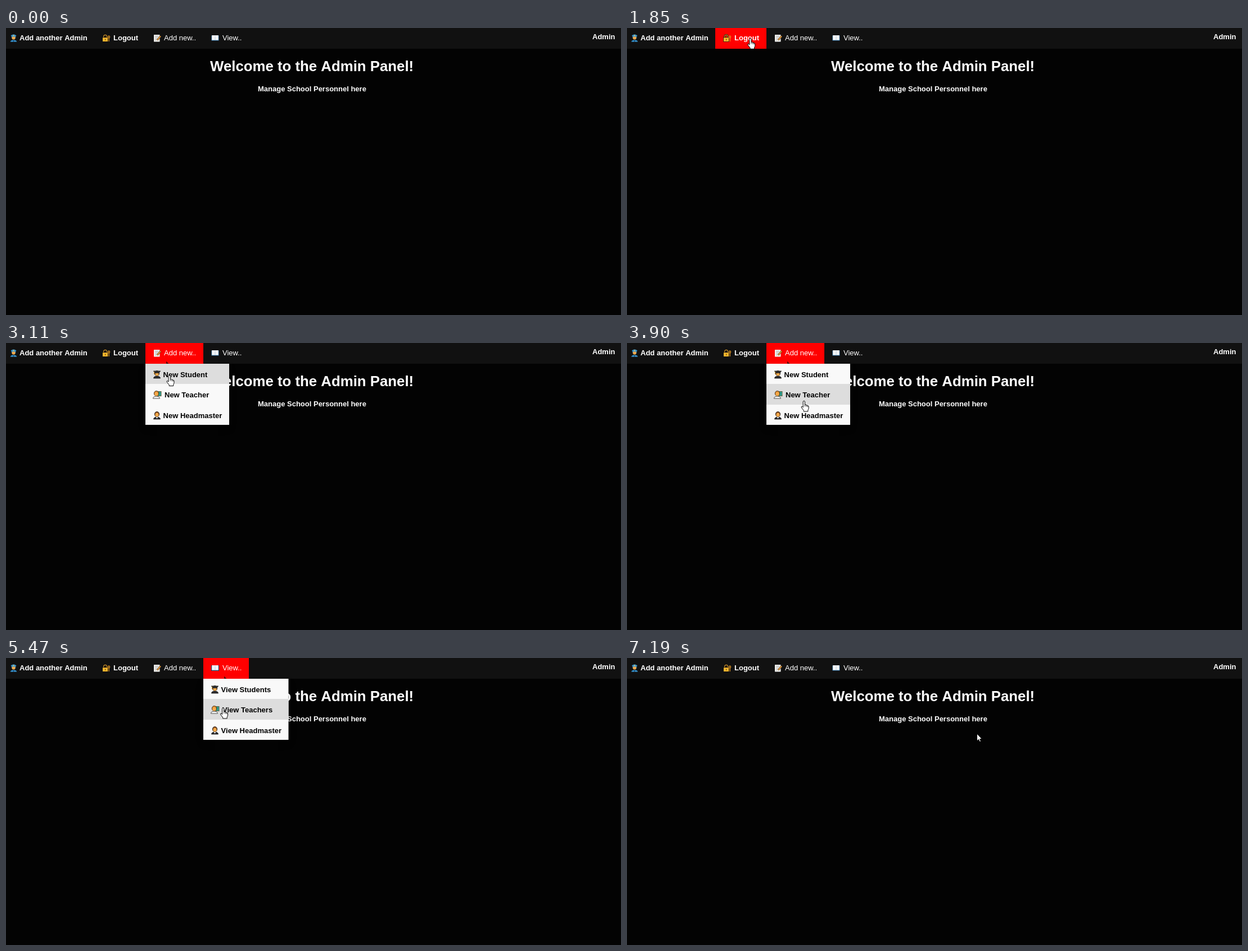
These frames come from a looping animation (1094 px wide and 512 px high, 7.29 s). An HTML page with a canvas:

```html
<!DOCTYPE html>
<html lang="en">
<head>
<meta charset="utf-8">
<title>Admin Panel</title>
<style>
html, body { margin: 0; width: 100%; height: 100%; overflow: hidden; background: #030303; }
canvas { display: block; }
</style>
</head>
<body>
<canvas id="stage" width="1094" height="512"></canvas>
<script>
const ctx = document.getElementById('stage').getContext('2d');
const LOOP = 7290;
const STEP = 78;
const FONT = '"Liberation Sans", Arial, sans-serif';
const SIZE = 13;
const NAV_H = 37;
const ROW_H = 36.4;
const INK = '#15130f';
const SKIN = '#f3a94a';

const ARROW = 'M0 0V13L3 10.3L5 14.5L7 13.7L5.2 9.5H9z';
const HAND = 'M-1.6 11.5V1.6Q-1.5 0 0 0Q1.5 0 1.6 1.6V6.8Q4 6 4.3 7.8Q6.3 7 6.5 8.7' +
  'Q8.3 8.3 8.3 10V13Q8 15 7 16.5V18.8H-.5V17L-4.6 11.7Q-5 9.4 -3.2 9.8z';

function rect(x, y, w, h, color) {
  ctx.fillStyle = color;
  ctx.fillRect(x, y, w, h);
}

function shape(d, fill, stroke, width = .7) {
  const p = new Path2D(d);
  if (fill) {
    ctx.fillStyle = fill;
    ctx.fill(p);
  }
  if (stroke) {
    ctx.strokeStyle = stroke;
    ctx.lineWidth = width;
    ctx.stroke(p);
  }
}

function oval(x, y, rx, ry, fill, stroke, width = .7) {
  ctx.beginPath();
  ctx.ellipse(x, y, rx, ry, 0, 0, 7);
  if (fill) {
    ctx.fillStyle = fill;
    ctx.fill();
  }
  if (stroke) {
    ctx.strokeStyle = stroke;
    ctx.lineWidth = width;
    ctx.stroke();
  }
}

function label(text, x, y, color = '#fff', weight = 'bold', size = SIZE) {
  ctx.font = `${weight} ${size}px ${FONT}`;
  ctx.fillStyle = color;
  ctx.fillText(text, x, y);
}

function at(x, y, draw) {
  ctx.save();
  ctx.translate(x, y);
  draw();
  ctx.restore();
}

function person(hair, coat, x = 7) {
  oval(x, 5, 4.2, 4.5, hair, INK);
  oval(x, 6.2, 3, 3.6, SKIN);
  at(x, 14, () => shape('M-6 0Q-5.7 -4 0 -4Q5.7 -4 6 0z', coat, INK));
}

// Each icon fills a box of about 14 by 14
const icons = {
  officer() {
    person('#2b6f9f', '#3693cf', 6.5);
    shape('M1.5 2.5Q6.5 -1.5 11.5 2.5L10 4.5H3z', '#3693cf');
    rect(5.5, 1.5, 2, 1.6, '#ffd65a');
    rect(6, 10.5, 1, 3.5, '#17395a');
  },
  lock() {
    oval(5.5, 4.5, 3, 3.2, null, INK, 2.6);
    oval(5.5, 4.5, 3, 3.2, null, '#c98f2c', 1.2);
    rect(.3, 5.5, 10.4, 8.2, INK);
    rect(1, 6.2, 9, 6.8, '#f9b62c');
    rect(5, 8.5, 1.2, 2.5, '#5b3a10');
    oval(12, 5, 1.5, 1.8, null, '#e79a25', 1.3);
    rect(11.4, 7, 1.3, 6, '#e79a25');
  },
  memo() {
    rect(1, 1, 10.5, 12.5, '#f1f1ee');
    for (let i = 0; i < 4; i++) rect(3, 3 + i * 2.3, 6 - i, .9, '#a3a7ab');
    shape('M13 3.5L7 10.5', null, '#4b3929', 3);
    shape('M13 3.5L7 10.5', null, '#f2a13b', 1.8);
  },
  book() {
    rect(0, 2, 14, 10, INK);
    rect(.5, 2.5, 13, 9, '#2d79b7');
    rect(1.2, 2, 11.6, 8.6, '#f5f7f9');
    rect(6.7, 2.5, .6, 8.5, '#9db4c6');
  },
  student() {
    person('#6b3d1e', '#2b2c2f');
    shape('M.8 1H13.2L10.5 4.5H3.5z', '#303236', INK);
    rect(1.5, 2, 1, 4.5, '#d79a28');
  },
  teacher() {
    rect(6, 1, 9, 9, '#714b24');
    rect(6.7, 1.7, 7.6, 7.6, '#2e9a8a');
    person('#d9852b', '#f1f3f4', 6);
  },
  headmaster() {
    person('#7a431d', '#292b30');
    shape('M5.2 10L7 13L8.8 10z', '#fff');
  }
};

const navItems = [
  { x: -7, w: 164, icon: 'officer', text: 'Add another Admin', indent: 31, weight: 'bold' },
  { x: 157, w: 91, icon: 'lock', text: 'Logout', indent: 34, weight: 'bold' },
  { x: 248, w: 103, icon: 'memo', text: 'Add new..', indent: 33, weight: 'normal' },
  { x: 351, w: 81, icon: 'book', text: 'View..', indent: 34, weight: 'normal' }
];

const menus = [
  { from: 2180, to: 4430, item: 2, w: 149, trace: 285,
    rows: ['New Student', 'New Teacher', 'New Headmaster'] },
  { from: 4430, to: 6970, item: 3, w: 151.5, trace: 388,
    rows: ['View Students', 'View Teachers', 'View Headmaster'] }
];
const rowIcons = ['student', 'teacher', 'headmaster'];

// Pointer moves; each begins where the last one ended, "via" bends the way
const entry = [643, 530];
const moves = [
  { start: 620, end: 1320, to: [301, 176], via: [208, 301] },
  { start: 1380, end: 1850, to: [219.5, 18.5] },
  { start: 2180, end: 2260, to: [275, 20.5] },
  { start: 2500, end: 2500, to: [279, 20.5] },
  { start: 2650, end: 2650, to: [280, 20.5] },
  { start: 2890, end: 3580, to: [323, 123], via: [288, 64] },
  { start: 3670, end: 4370, to: [338, 12], via: [301, 119] },
  { start: 4430, end: 4700, to: [388, 18] },
  { start: 4850, end: 5560, to: [386, 97] },
  { start: 5630, end: 5880, to: [388, 123] },
  { start: 6330, end: 7050, to: [561, 61], via: [369, 48] },
  { start: 7110, end: 7190, to: [622.5, 135] }
];

// The pointer is sampled in even steps within each move
function progress({ start, end }, t) {
  const n = Math.round((end - start) / STEP) + 1;
  const step = (end - start) / (n - 1) || 1;
  return Math.min(n, Math.floor((t - start) / step + .2) + 1) / n;
}

function pointerAt(t) {
  const i = moves.filter(m => t >= m.start).length - 1;
  if (i < 0) return null;
  const { to, via } = moves[i];
  const from = i ? moves[i - 1].to : entry;
  const u = progress(moves[i], t);
  const [x, y] = from.map((a, k) => {
    const mid = via ? via[k] : (a + to[k]) / 2;
    return a * (1 - u) ** 2 + 2 * mid * u * (1 - u) + to[k] * u * u;
  });
  return { x, y };
}

function drawPage() {
  rect(0, 0, 1094, 512, '#030303');
  rect(0, 0, 1094, NAV_H, '#111');
  label('Welcome to the Admin Panel!', 363, 77, '#fff', 'bold', 25.8);
  label('Manage School Personnel here', 448, 113);
  label('Admin', 1043, 20);
}

function drawNav(active) {
  navItems.forEach((item, i) => {
    if (i === active) rect(item.x, 0, item.w, NAV_H, '#f00');
    at(item.x + 14, 11, icons[item.icon]);
    label(item.text, item.x + item.indent, 22, '#fff', item.weight);
  });
}

function drawMenu(menu, hover) {
  const { x } = navItems[menu.item];
  const rowY = i => Math.round(NAV_H + i * ROW_H);
  ctx.save();
  ctx.shadowColor = 'rgba(0,0,0,.2)';
  ctx.shadowBlur = 13;
  ctx.shadowOffsetY = 6.5;
  rect(x, NAV_H, menu.w, rowY(3) - NAV_H, '#f9f9f9');
  ctx.restore();
  menu.rows.forEach((text, i) => {
    const y = rowY(i);
    if (i === hover) rect(x, y, menu.w, rowY(i + 1) - y, '#ddd');
    at(x + 13.5, y + 12, icons[rowIcons[i]]);
    label(text, x + (i === 1 ? 34 : 31.6), y + 24, '#000');
  });
}

function drawPointer(p, hand) {
  at(p.x, p.y, () => {
    ctx.lineJoin = 'round';
    shape(hand ? HAND : ARROW, '#fff', '#000', 1);
    if (hand) shape('M1.6 6.8V10M4.3 7.8V10.5M6.5 8.7V11', null, '#000', .8);
  });
}

function draw(t) {
  const p = pointerAt(t);
  const menu = menus.find(m => t >= m.from && t < m.to);
  const onLogout = !!p && !menu && p.y < NAV_H && p.x >= 157 && p.x < 248;
  const hover = menu && p.y >= NAV_H ? Math.floor((p.y - NAV_H) / ROW_H) : -1;

  drawPage();
  drawNav(menu ? menu.item : onLogout ? 1 : -1);
  if (menu) {
    if (hover >= 0) at(menu.trace, 32.5, () => shape('M0 0V5H5z', '#4b0808'));
    drawMenu(menu, hover);
  }
  if (p) drawPointer(p, onLogout || hover >= 0);
}

const origin = performance.now();
function tick() {
  draw((performance.now() - origin) % LOOP);
  requestAnimationFrame(tick);
}
tick();
</script>
</body>
</html>
```
